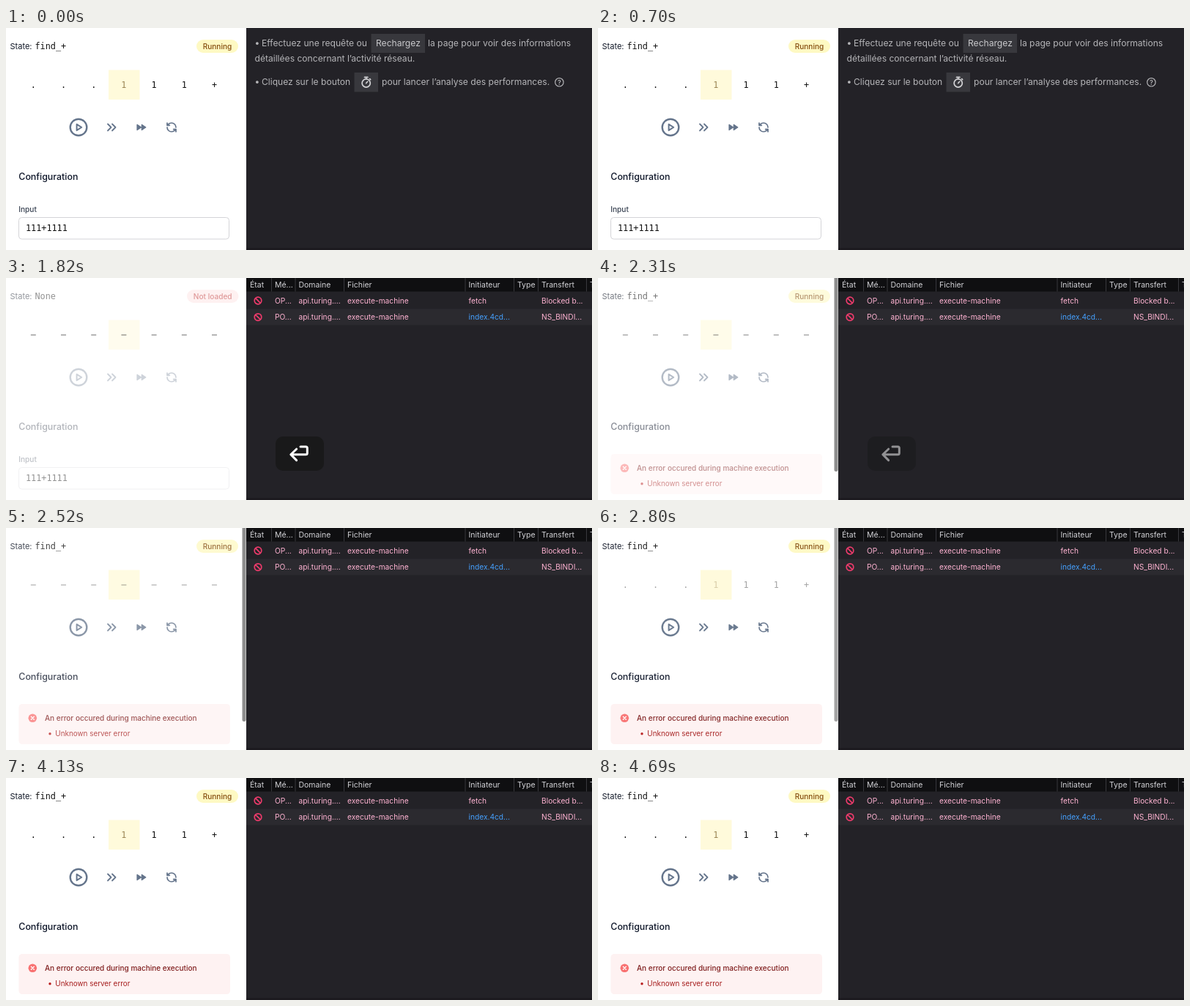
An HTML page for the animation above (4.76 s loop, 800 by 304 pixels).

```html
<!DOCTYPE html>
<html lang="fr">
<head>
<meta charset="utf-8">
<title>Machine runner</title>
<style>
  html, body { margin: 0; width: 100%; height: 100%; overflow: hidden; background: #fff; }
  svg { display: block; width: 100%; height: 100%; font-family: Inter, "Open Sans", sans-serif; }
  .mono { font-family: "DejaVu Sans Mono", "Liberation Mono", monospace; font-size: 11.8px; fill: #111; }
  .mid { text-anchor: middle; }
  .small { font-size: 10.1px; font-weight: 500; }
  .line { fill: none; stroke-linecap: round; stroke-linejoin: round; }
  .hint { font-size: 12.1px; fill: #b5b5b8; }
  .head { font-size: 10.5px; fill: #d2d2d6; }
  .row { font-size: 10.2px; fill: #ffb3d2; }
</style>
</head>
<body>
<svg viewBox="0 0 800 304" xml:space="default">
  <rect width="800" height="304" fill="#fff"/>

  <!-- machine panel -->
  <g id="status">
    <text x="5.5" y="29" font-size="11" fill="#111827">State:</text>
    <text id="state" class="mono" x="39.5" y="29"></text>
    <g id="running">
      <rect x="260" y="16" width="57" height="18" rx="9" fill="#fef9c3"/>
      <text class="small mid" x="288.5" y="28.8" fill="#854d0e">Running</text>
    </g>
    <g id="unloaded">
      <rect x="247" y="16" width="70.5" height="18" rx="9" fill="#fee2e2"/>
      <text class="small mid" x="282.2" y="28.8" fill="#b91c1c">Not loaded</text>
    </g>
    <rect x="140" y="57.5" width="42.5" height="40.5" fill="#fffadb"/>
    <text id="typed" class="mono" x="27" y="278">111+1111</text>
  </g>
  <g id="dashes"></g>

  <g id="panel">
    <g id="chars"></g>
    <g class="line" stroke="#64748b" stroke-width="2">
      <circle cx="99" cy="136" r="11.3" stroke-width="2.4"/>
      <path d="M96.6 131.8V140.2L103.2 136Z"/>
      <path d="M139 131.5L143.5 136L139 140.5M145 131.5L149.5 136L145 140.5" stroke-width="1.8"/>
      <path d="M179 132.3V139.7L184.5 136ZM185.3 132.3V139.7L190.8 136Z" fill="#64748b" stroke-width="1.2"/>
      <path transform="translate(218 128) scale(.667)" stroke-width="2.6"
        d="M21 12a9 9 0 0 0-9-9 9.75 9.75 0 0 0-6.74 2.74L3 8M3 3v5h5M3 12a9 9 0 0 0 9 9 9.75 9.75 0 0 0 6.74-2.74L21 16M16 16h5v5"/>
    </g>
    <text x="17.3" y="208" font-size="12.4" font-weight="500" fill="#0f172a">Configuration</text>
    <g id="form">
      <text class="small" x="17.3" y="252.3" fill="#374151">Input</text>
      <rect x="17.5" y="259.5" width="287" height="29.5" rx="4" fill="none" stroke="#d4d4d8"/>
    </g>
    <g id="error">
      <rect x="17.5" y="241" width="288.5" height="55" rx="4.5" fill="#fef2f2"/>
      <circle cx="36.3" cy="260.3" r="5.8" fill="#f87171"/>
      <path class="line" d="M34.3 258.3l4 4m0-4l-4 4" stroke="#fff" stroke-width="1.3"/>
      <text x="53" y="264" font-size="10" font-weight="500" fill="#7f1d1d">An error occured during machine execution</text>
      <circle cx="60" cy="281.7" r="1.7" fill="#b91c1c"/>
      <text x="67.3" y="285" font-size="9.9" fill="#a51d1d">Unknown server error</text>
    </g>
  </g>
  <path id="scroll" d="M322.5 0H327.5V262.5a2.5 2.5 0 0 1-5 0Z" fill="#8e8e8e"/>

  <!-- network panel -->
  <rect x="328" width="472" height="304" fill="#232227"/>
  <rect x="328" y="301" width="472" height="3" fill="#1c1a1f"/>
  <g id="hints" class="hint">
    <text x="339.5" y="25.3">•</text>
    <text x="349" y="25.3">Effectuez une requête ou</text>
    <rect x="498.5" y="8" width="73.5" height="26" fill="#38383d"/>
    <text x="505" y="25.3" fill="#c9c9cc">Rechargez</text>
    <text x="576" y="25.3">la page pour voir des informations</text>
    <text x="339.5" y="45.6">détaillées concernant l’activité réseau.</text>
    <text x="339.5" y="78">•</text>
    <text x="349" y="78">Cliquez sur le bouton</text>
    <rect x="475.5" y="61" width="32.5" height="26.5" fill="#38383d"/>
    <g class="line" stroke="#d2d2d5" stroke-width="1.7">
      <circle cx="491.7" cy="75.5" r="5.6"/>
      <path d="M489.5 67.4h4.4M491.7 67.6v2M491.7 75.5l2-2.2M496.6 69.6l1 1"/>
    </g>
    <text x="513" y="78">pour lancer l’analyse des performances.</text>
    <circle cx="755.4" cy="74.3" r="5.7" fill="none" stroke="#b5b5b8" stroke-width="1.2"/>
    <text class="mid" x="755.4" y="77.6" font-size="9" font-weight="600" style="font-size:9px">?</text>
  </g>
  <g id="table">
    <rect x="328" width="472" height="18.5" fill="#0f0f11"/>
    <rect x="328" y="42.3" width="472" height="22.2" fill="#2b2a2f"/>
  </g>

  <g id="key">
    <rect x="368" y="217" width="66" height="47" rx="10" fill="#19191a"/>
    <path class="line" stroke="#fff" stroke-width="3"
      d="M402 231H409.3Q411.3 231 411.3 233V239.8Q411.3 241.8 409.3 241.8H389.5M396.6 234.2L388.8 241.8L396.6 249.6"/>
  </g>
</svg>
<script>
const LOOP = 4760, STEP = 70;
const $ = id => document.getElementById(id);

function add(parent, tag, attrs, text = '') {
  const el = document.createElementNS('http://www.w3.org/2000/svg', tag);
  for (const k in attrs) el.setAttribute(k, attrs[k]);
  el.textContent = text;
  parent.append(el);
}

// tape
[...'...111+'].forEach((ch, i) => {
  const x = 37.3 + 41.2 * i;
  add($('chars'), 'text', { class: 'mono mid', x, y: 82, style: i === 3 ? 'fill:#9c8757' : '' }, ch);
  add($('dashes'), 'rect', { x: x - 3.5, y: 77.4, width: 7, height: 1.2, fill: '#222' });
});

// request list
const columns = [333, 367, 399.5, 466, 631.5, 698, 731, 797];
const heads = ['État', 'Mé...', 'Domaine', 'Fichier', 'Initiateur', 'Type', 'Transfert', 'T'];
const rows = [
  ['', 'OP...', 'api.turing....', 'execute-machine', 'fetch', '', 'Blocked b...'],
  ['', 'PO...', 'api.turing....', 'execute-machine', 'index.4cd...', '', 'NS_BINDI...']
];
const table = $('table');
heads.forEach((h, i) => {
  add(table, 'text', { class: 'head', x: columns[i], y: 12.6 }, h);
  if (i) add(table, 'rect', { x: columns[i] - 5, y: 0, width: 1, height: 18.5, fill: '#38383d' });
});
rows.forEach((cells, r) => {
  const y = 31 + 22.6 * r;
  add(table, 'path', {
    d: `M339.2 ${y}a4.8 4.8 0 1 0 9.6 0a4.8 4.8 0 1 0 -9.6 0M340.7 ${y - 3.3}l6.6 6.6`,
    fill: 'none', stroke: '#ee3b6c', 'stroke-width': 1.7
  });
  cells.forEach((c, i) => {
    const link = c.startsWith('index');
    add(table, 'text', { class: 'row', x: columns[i], y: y + 3.7, style: link ? 'fill:#45a1ff' : '' }, c);
  });
});

// opacity over time: [ms, value], linear between entries
const tracks = {
  panel:  [[1120, 1], [1330, .68], [1680, .32], [2170, .32], [2520, .75], [2800, .95], [3080, 1]],
  status: [[1120, 1], [1330, .74], [1680, .45], [2170, .45], [2520, .78], [2800, .95], [3080, 1]],
  chars:  [[1330, 1], [1470, 0], [2660, 0], [3010, 1]],
  dashes: [[1330, 0], [1540, .55], [2170, .55], [2520, .36], [2800, 0]],
  key:    [[1120, 0], [1260, 1], [2170, 1], [2450, 0]],
  scroll: [[2170, 0], [2310, 1], [2730, 1], [3080, 0]]
};

function at(track, t) {
  let [t0, v0] = track[0];
  for (const [t1, v1] of track) {
    if (t < t1) return t1 === track[0][0] ? v1 : v0 + (v1 - v0) * (t - t0) / (t1 - t0);
    [t0, v0] = [t1, v1];
  }
  return v0;
}

const show = (id, on) => { $(id).style.display = on ? '' : 'none'; };

function draw(now) {
  const t = Math.floor(now % LOOP / STEP) * STEP;
  for (const id in tracks) $(id).style.opacity = at(tracks[id], t);
  const waiting = t >= 1190 && t < 2240, failed = t >= 2240, listed = t >= 1400;
  $('state').textContent = waiting ? 'None' : 'find_+';
  show('running', !waiting);
  show('unloaded', waiting);
  show('form', !failed);
  show('typed', !failed);
  show('error', failed);
  show('hints', !listed);
  show('table', listed);
}

const start = performance.now();
function tick() {
  draw(performance.now() - start);
  requestAnimationFrame(tick);
}
tick();
</script>
</body>
</html>
```
